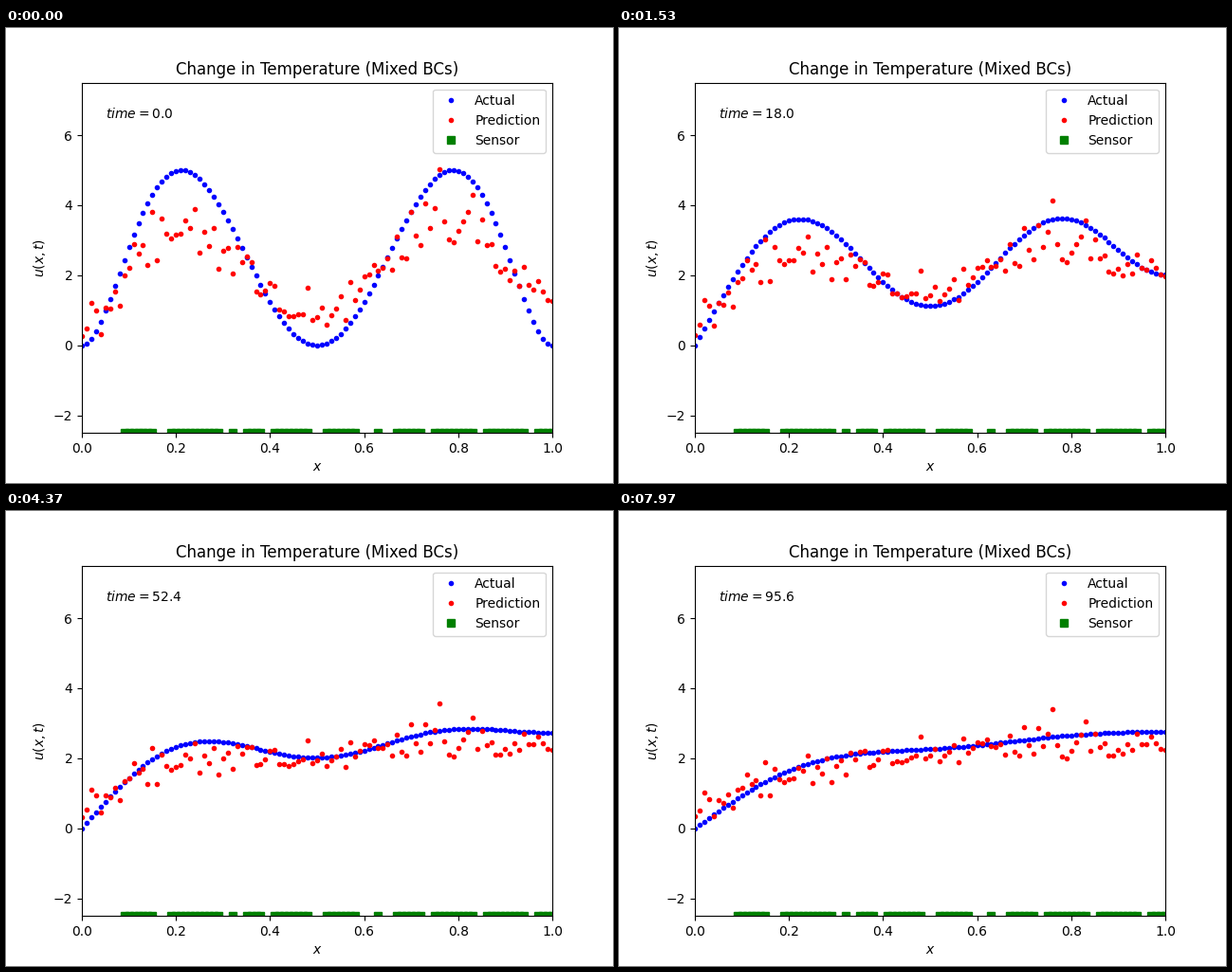
Recreate the animation shown at these times as a matplotlib script. Size 640 by 480 pixels, loop 8 s.

```python
import numpy as np
import matplotlib.pyplot as plt
from matplotlib.animation import FuncAnimation

FRAMES = 240
LOOP_MS = 8000
DT = 0.4
ALPHA = 3e-4

rng = np.random.default_rng(4)
x = np.linspace(0, 1, 101)


def initial(s):
    return 2160 * (s * (1 - s) * (s - 0.5)) ** 2


# Heat equation with u(0) = 0 and u'(1) = 0, solved by a sine series
wave = (np.arange(1, 121) - 0.5) * np.pi
fine = np.linspace(0, 1, 4001)
coef = 2 * np.sin(np.outer(wave, fine)) @ initial(fine) / 4000
modes = np.sin(np.outer(x, wave))


def actual(t):
    return modes @ (coef * np.exp(-ALPHA * wave ** 2 * t))


# The prediction damps the swing of the solution and adds a fixed error per point
gain = 0.55 - 0.2 * x ** 6
trend = 0.5 + 0.8 * x
error = rng.normal(0, 0.24, len(x))
error[76] = 0.95  # the one clear outlier


def predicted(t):
    spread = 1 + 0.5 * np.exp(-ALPHA * wave[3] ** 2 * t)
    return gain * actual(t) + trend + spread * error


# Sensors sit on every grid point from 0.09 on, except in these gaps
GAPS = [(16, 18), (30, 31), (33, 34), (39, 40), (49, 51),
        (59, 62), (64, 66), (73, 74), (84, 85), (95, 96)]
sensors = np.array([i for i in range(9, 101)
                    if not any(a <= i <= b for a, b in GAPS)]) / 100

fig, ax = plt.subplots(figsize=(6.4, 4.8), dpi=100)
ax.set(xlim=(0, 1), ylim=(-2.5, 7.5), xlabel="$x$", ylabel="$u(x,t)$",
       title="Change in Temperature (Mixed BCs)")

actual_dots, = ax.plot(x, actual(0), "b.", label="Actual")
predicted_dots, = ax.plot(x, predicted(0), "r.", label="Prediction")
ax.plot(sensors, np.full(len(sensors), -2.5), "gs", label="Sensor")
ax.legend(loc="upper right")
clock = ax.text(0.05, 6.5, "")


def update(i):
    t = i * DT
    actual_dots.set_ydata(actual(t))
    predicted_dots.set_ydata(predicted(t))
    clock.set_text(f"$time = {t:.1f}$")
    return actual_dots, predicted_dots, clock


anim = FuncAnimation(fig, update, frames=FRAMES, interval=LOOP_MS / FRAMES,
                     repeat=True, repeat_delay=0)
plt.show()
```
